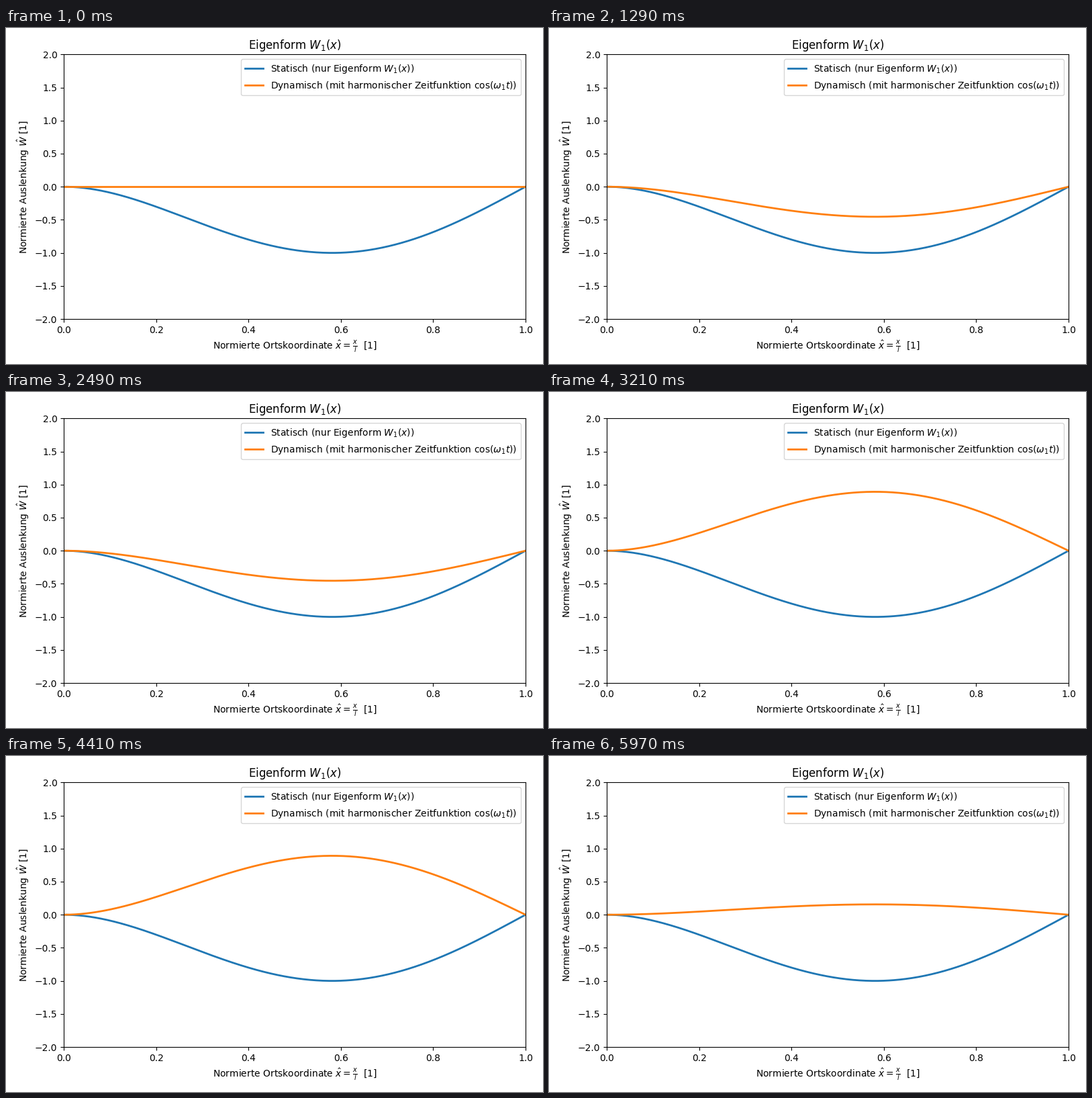
Write a matplotlib script that moves like this. It is 800 px wide and 500 px high and loops after 6 s.

```python
import numpy as np
import matplotlib.pyplot as plt
from matplotlib.animation import FuncAnimation

FRAMES = 200
INTERVAL = 30   # ms
PERIOD = 40     # frames per oscillation
LAMBDA = 3.926602312  # first root of tan(k) = tanh(k)


def mode_shape(x, k):
    """Clamped-pinned beam mode, scaled to a peak of -1."""
    sigma = (np.cosh(k) - np.cos(k)) / (np.sinh(k) - np.sin(k))
    w = np.cos(k * x) - np.cosh(k * x) + sigma * (np.sinh(k * x) - np.sin(k * x))
    return w / np.abs(w).max()


x = np.linspace(0, 1, 500)
w = mode_shape(x, LAMBDA)

fig, ax = plt.subplots(figsize=(8, 5), dpi=100)
ax.plot(x, w, lw=2, color="tab:blue",
        label="Statisch (nur Eigenform $W_1(x)$)")
wave, = ax.plot(x, 0 * w, lw=2, color="tab:orange",
                label=r"Dynamisch (mit harmonischer Zeitfunktion $\cos(\omega_1 t)$)")
ax.set_xlim(0, 1)
ax.set_ylim(-2, 2)
ax.set_title("Eigenform $W_1(x)$")
ax.set_xlabel(r"Normierte Ortskoordinate $\hat{x} = \frac{x}{l}$  [1]")
ax.set_ylabel(r"Normierte Auslenkung $\hat{W}$ [1]")
ax.legend(loc="upper right")
fig.tight_layout()


def update(i):
    wave.set_ydata(w * np.sin(2 * np.pi * i / PERIOD))
    return wave,


anim = FuncAnimation(fig, update, frames=FRAMES, interval=INTERVAL,
                     blit=True, repeat=True, repeat_delay=0)
plt.show()
```
